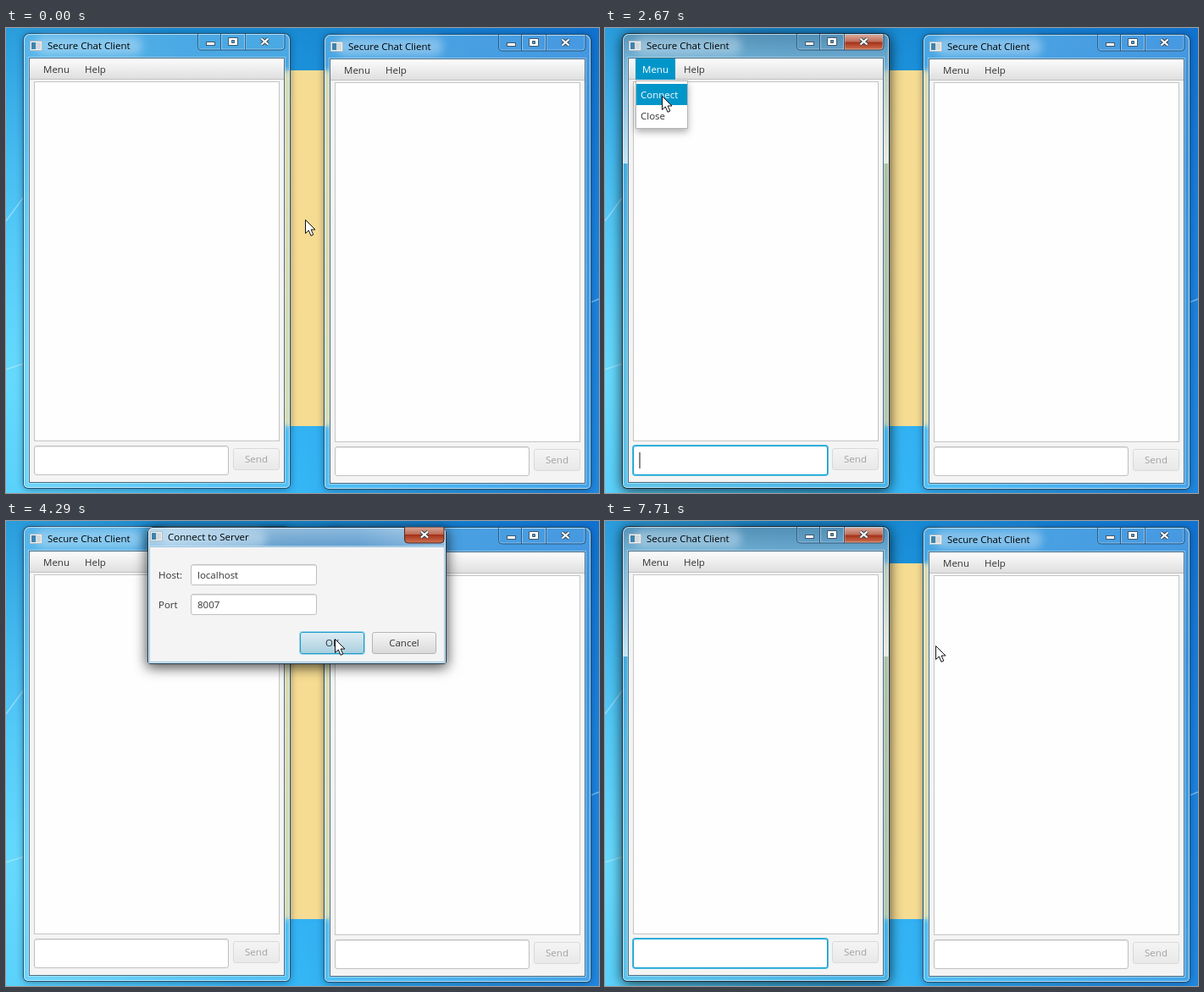
These frames come from a looping animation (700x549 px, 8000 ms). An HTML page:

```html
<!DOCTYPE html>
<html lang="en">
<meta charset="utf-8">
<title>Secure chat client</title>
<style>
  html, body { margin: 0; width: 100%; height: 100%; overflow: hidden; }
  body { font: 11.5px/25px "Open Sans", "Noto Sans", sans-serif; color: #333; white-space: nowrap; }
  div, i, svg { position: absolute; box-sizing: border-box; font-style: normal; }
  #stage {
    width: 700px; height: 549px; overflow: hidden;
    background:
      radial-gradient(ellipse 300px 540px at 0 75%, rgba(112,225,255,.85), transparent),
      linear-gradient(90deg, transparent 50%, rgba(10,90,205,.5)),
      linear-gradient(#188bd4, #2ba8ee 45%, #35b6f5);
  }
  #emblem { left: 145px; top: 50px; width: 420px; height: 420px; background: #f6dc92; }

  .win {
    width: 314px; height: 536px; border-radius: 7px 7px 5px 5px; backdrop-filter: blur(3px);
    background: linear-gradient(rgba(160,215,250,.38), rgba(160,215,250,.25) 153px, rgba(150,220,250,.32));
    box-shadow: inset 0 0 0 1px rgba(225,245,255,.7), 0 0 0 1px #24506e, 0 1px 8px rgba(0,20,50,.5);
  }
  .win.active {
    background: linear-gradient(rgba(115,145,165,.65), rgba(150,185,205,.65) 30px, rgba(228,240,247,.8) 153px,
      rgba(70,150,195,.4) 153px, rgba(100,180,215,.45));
    box-shadow: inset 0 0 0 1px rgba(225,245,255,.7), 0 0 0 1px #1b2a36, 0 2px 15px 1px rgba(0,0,0,.75);
  }
  .glow { left: 14px; top: 3px; width: 126px; height: 22px; border-radius: 11px; background: rgba(225,242,252,.38); filter: blur(5px); }
  .icon { left: 7px; top: 8px; width: 15px; height: 12px; border: 2px solid #eef2f4; outline: 1px solid rgba(90,110,125,.4); outline-offset: -1px;
    background: linear-gradient(90deg, #3f83ac 45%, #d3dadd 45%); }
  .title { left: 28px; top: 1px; color: #000; }
  .caps { left: 205px; top: 0; }
  .red { display: none; }
  .active .red { display: block; }
  .client { left: 6px; top: 28px; width: 302px; height: 502px; border: 1px solid #4c6d84; background: #f4f4f4; box-shadow: 0 0 0 1px rgba(225,245,255,.45); }
  .bar { left: 7px; top: 29px; width: 300px; height: 25px; background: linear-gradient(#fcfcfc, #dfdfdf); border-bottom: 1px solid #c2c2c2; }
  .item { top: 0; height: 25px; padding: 0 8px; }
  .hot { background: #0096c9; color: #fff; }
  .area { left: 12px; top: 56px; width: 290px; height: 425px; background: #fefefe; border: 1px solid #c5c5c5; }
  .field { background: #fff; border: 1px solid #c0c0c0; border-radius: 3px; box-shadow: inset 0 1px 1px #e3e3e3; padding-left: 7px; line-height: 23px; }
  .field.focus { border-color: #039ed3; box-shadow: 0 0 0 1px rgba(3,158,211,.65); }
  .caret { display: none; left: 6px; top: 7px; width: 2px; height: 19px; background: #888; }
  .btn { height: 26px; border: 1px solid #b4b4b4; border-radius: 3px; text-align: center; line-height: 24px; background: linear-gradient(#f6f6f6, #dadada); }
  .send { left: 247px; top: 489px; width: 55px; opacity: .42; }

  #popup { left: 36px; top: 62px; width: 62px; height: 57px; background: #fff; border: 1px solid #b5b5b5; box-shadow: 0 4px 8px rgba(0,0,0,.3); }
  #popup div { left: 0; width: 60px; height: 25px; padding-left: 5px; }
  #dialog {
    left: 167px; top: 7px; width: 353px; height: 162px; border-radius: 6px 6px 3px 3px;
    background: linear-gradient(rgba(255,255,255,.3), transparent 24px), linear-gradient(90deg, #9fcbe8, #659fcc 45%, #5f9dcf 70%, #8bbbe0);
    box-shadow: inset 0 0 0 1px #22394b, inset 0 0 0 2px rgba(235,248,255,.75), 0 3px 15px 1px rgba(0,0,0,.7);
  }
  #dialog.fading {
    opacity: .48; transform: translate(5.5px, 1.5px) perspective(500px) rotateX(-7.5deg) scale(.96, .985);
    box-shadow: inset 0 0 0 2px rgba(235,248,255,.75), 0 3px 10px rgba(0,0,0,.6);
  }
  #dialog .client { left: 2px; top: 23px; width: 349px; height: 137px; border-color: #9ac3df; }
  #dialog .icon { left: 3px; top: 5px; }
  #dialog .title { left: 24px; top: -1px; }
  #dialog .field { left: 51px; width: 149px; height: 25px; }
  #dialog .btn { top: 124px; width: 76px; }
  #dialog.blank .client { background: #fff; }
  #dialog.blank .content { display: none; }
  .content { left: 0; top: 0; width: 100%; height: 100%; }
  #ok { left: 180px; border-color: #1b9bc8; box-shadow: 0 0 0 1px rgba(3,158,211,.35); }
  #ok.over { background: linear-gradient(#dcecf3, #a9cfdf); }
  #click { width: 24px; height: 24px; border-radius: 50%; background: rgba(186,200,45,.65); }
</style>
<div id="stage">
  <svg width="700" height="549" stroke="#c8f2ff" stroke-opacity=".5" stroke-width="1.5" fill="none">
    <path d="M0 228L22 198M0 403L22 396M338 282L372 248M690 324L700 320" />
  </svg>
  <div id="emblem"></div>
  <div id="popup"><div id="connect" style="top:3px">Connect</div><div style="top:28px">Close</div></div>
  <div id="dialog">
    <div class="glow"></div><i class="icon"></i>
    <svg style="left:303px;top:0" width="48" height="20"></svg>
    <div class="client"></div>
    <div class="content">
      <div class="title">Connect to Server</div>
      <div style="left:13px;top:44px">Host:</div><div class="field" style="top:44px">localhost</div>
      <div style="left:13px;top:79px">Port</div><div class="field" style="top:79px">8007</div>
      <div class="btn" id="ok">OK</div><div class="btn" style="left:265px">Cancel</div>
    </div>
  </div>
  <div id="click"></div>
  <svg id="cursor" width="14" height="21">
    <path d="M.5 .5V16.5L4.3 13L7 19.3L9.8 18L7.1 12H12Z" fill="#fff" stroke="#111" />
  </svg>
</div>
<script>
const LOOP = 8000;
const $ = id => document.getElementById(id);
const stage = $('stage'), popup = $('popup'), dialog = $('dialog');

const cross = x => `<path d="M${x - 4} 5.5l8 7m0-7l-8 7" stroke="#34434f" stroke-width="4.2"/>
  <path d="M${x - 4} 5.5l8 7m0-7l-8 7" stroke="#fff" stroke-width="2.2"/>`;
const redFill = `<linearGradient id="redFill" x2="0" y2="1"><stop stop-color="#dba89a"/>
  <stop offset=".45" stop-color="#bd6d57"/><stop offset=".5" stop-color="#a53119"/><stop offset="1" stop-color="#cf7453"/></linearGradient>`;

function addWindow(x, y) {
  const win = document.createElement('div');
  win.className = 'win';
  win.style.cssText = `left:${x}px;top:${y}px`;
  win.innerHTML = `
    <div class="glow"></div><i class="icon"></i><div class="title">Secure Chat Client</div>
    <svg class="caps" width="104" height="20">${redFill}
      <path class="red" d="M56 1H102V15q0 4-4 4H56Z" fill="url(#redFill)"/>
      <path d="M1 1V15q0 3 3 3H99q3 0 3-3V1M28.5 1V18M55.5 1V18M57 1V18" fill="none" stroke="#fff" stroke-opacity=".4"/>
      <path d="M.5 0V15q0 4 4 4H99q4 0 4-4V0M27.5 0V19M56.5 0V19" fill="none" stroke="#1d4262" stroke-opacity=".75"/>
      <rect x="10.5" y="9.5" width="10" height="4" fill="#fff" stroke="#40586b"/>
      <path d="M36.5 4.5h11v9h-11zM40.5 7.5v3h3v-3z" fill="#fff" fill-rule="evenodd" stroke="#40586b"/>
      ${cross(79.5)}
    </svg>
    <div class="client"></div>
    <div class="bar"><div class="item menu" style="left:8px;width:47px">Menu</div><div class="item" style="left:57px">Help</div></div>
    <div class="area"></div>
    <div class="field" style="left:12px;top:486px;width:230px;height:35px"><i class="caret"></i></div>
    <div class="btn send">Send</div>`;
  stage.insertBefore(win, popup);
  return win;
}

const left = addWindow(21, 7);
addWindow(376, 8);
dialog.querySelector('svg').innerHTML =
  `<path d="M.5 0V15q0 4 4 4H43q4 0 4-4V0Z" fill="url(#redFill)" stroke="#4b2b29"/>${cross(24)}`;
const menu = left.querySelector('.menu');
const field = left.querySelector('.field');
const caret = left.querySelector('.caret');

// Stepped moves: first step, last step, number of steps, end point
const moves = [
  [430, 1250, 5, 61, 45],
  [2080, 2670, 4, 67, 80],
  [2850, 2850, 1, 68, 82],
  [3270, 3890, 4, 384, 81],
  [4090, 4290, 2, 388, 139],
  [4490, 4490, 1, 389, 153],
  [4690, 4690, 1, 390, 147]
];

function cursorAt(t) {
  let x = 353, y = 226;
  for (const [from, to, n, endX, endY] of moves) {
    if (t < from) break;
    const gap = (to - from) / (n - 1) || 1;
    const p = Math.min(1, (1 + Math.floor((t - from) / gap + 1e-6)) / n);
    const ease = n > 1 ? p * p * (3 - 2 * p) : 1;
    x += (endX - x) * ease;
    y += (endY - y) * ease;
  }
  return [Math.round(x), Math.round(y)];
}

const show = (el, on) => { el.style.display = on ? 'block' : 'none'; };

function draw(t) {
  const within = (a, b) => t >= a && t < b;
  const [x, y] = cursorAt(t);
  $('cursor').style.transform = `translate(${x}px,${y}px)`;
  $('click').style.transform = `translate(${x - 12}px,${y - 14}px)`;
  show($('click'), within(1650, 1890) || within(2850, 3050) || within(4890, 5090));

  left.classList.toggle('active', within(1650, 3050) || t >= 5310);
  menu.classList.toggle('hot', within(1250, 3270));
  show(popup, within(1890, 3050));
  $('connect').classList.toggle('hot', y > 65);
  field.classList.toggle('focus', within(1890, 3270) || t >= 7110);
  show(caret, within(1890, 3270) || within(7340, 7710));

  const opening = within(3050, 3270);
  show(dialog, within(3050, 5510));
  dialog.classList.toggle('blank', opening);
  dialog.classList.toggle('fading', opening || within(5310, 5510));
  $('ok').classList.toggle('over', y > 130 && t < 5310);
}

const start = performance.now();
function tick() {
  draw((performance.now() - start) % LOOP);
  requestAnimationFrame(tick);
}
tick();
</script>
</html>
```
